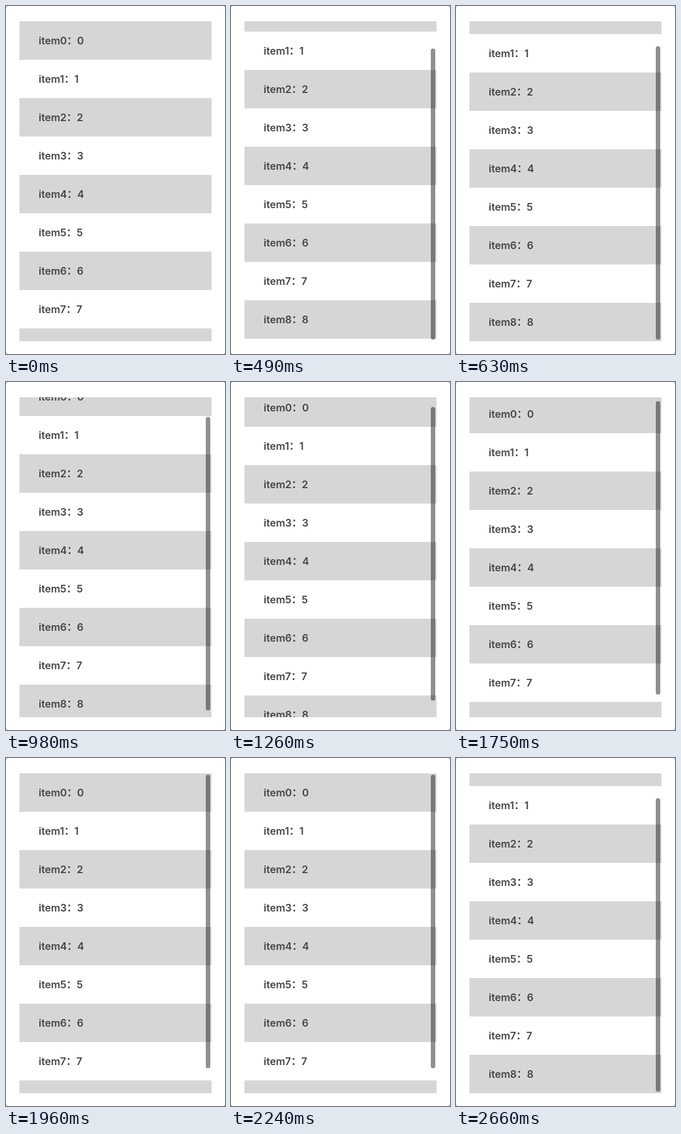
These frames come from a looping animation (342 by 544 pixels, 3.08 s). An HTML page:

```html
<!DOCTYPE html>
<html lang="zh-CN">
<head>
<meta charset="utf-8">
<title>Bouncing list</title>
<style>
  html, body { margin: 0; width: 100%; height: 100%; overflow: hidden; background: #8a8a8a; }
  svg { display: block; width: 342px; height: 544px; }
  text { font: 600 16px Inter, "Noto Sans CJK SC", "Noto Sans CJK", sans-serif; fill: #444; }
</style>
</head>
<body>
<svg viewBox="0 0 342 544">
  <clipPath id="view"><rect x="21" y="24" width="300" height="500"/></clipPath>
  <rect width="342" height="544" rx="3" fill="#fff"/>
  <g clip-path="url(#view)"><g id="list"></g></g>
  <rect id="bar" x="312" width="7" rx="3.5" fill="#000" fill-opacity=".44"/>
</svg>
<script>
const LOOP = 3080, STEP = 70, ROW = 60, MAX = 40, BAR_START = 420;
const list = document.getElementById('list');
const bar = document.getElementById('bar');

// [time in ms, scroll offset in px]
const keys = [
  [0, 0], [350, 0], [420, 38], [490, 44], [560, 42], [630, 40], [840, 40],
  [1050, 26], [1260, 14], [1540, 12], [1610, 10], [1750, 4], [1820, 2],
  [1960, 0], [2240, 0], [2310, 4], [2450, 32], [2520, 40], [LOOP, 40]
];

function add(tag, attrs, content = '') {
  const el = document.createElementNS('http://www.w3.org/2000/svg', tag);
  for (const name in attrs) el.setAttribute(name, attrs[name]);
  el.textContent = content;
  list.append(el);
}

for (let i = 0; i < 9; i++) {
  const y = 24 + i * ROW;
  if (i % 2 === 0) add('rect', { x: 21, y, width: 300, height: ROW, fill: '#d6d6d6' });
  add('text', { x: 51, y: y + 36 }, `item${i}：${i}`);
}

function scrollAt(t) {
  const i = keys.findIndex(([time]) => time > t);
  const [t0, s0] = keys[i - 1], [t1, s1] = keys[i];
  return Math.round(s0 + (s1 - s0) * (t - t0) / (t1 - t0));
}

function draw(now) {
  const t = Math.floor(now % LOOP / STEP) * STEP;
  const s = scrollAt(t);
  const over = Math.max(0, s - MAX);
  list.setAttribute('transform', `translate(0 ${-s})`);
  bar.setAttribute('y', 26 + s * 0.92);
  bar.setAttribute('height', 459 - over);
  bar.setAttribute('visibility', t < BAR_START ? 'hidden' : 'visible');
}

const start = performance.now();
function tick() {
  draw(performance.now() - start);
  requestAnimationFrame(tick);
}
tick();
</script>
</body>
</html>
```
